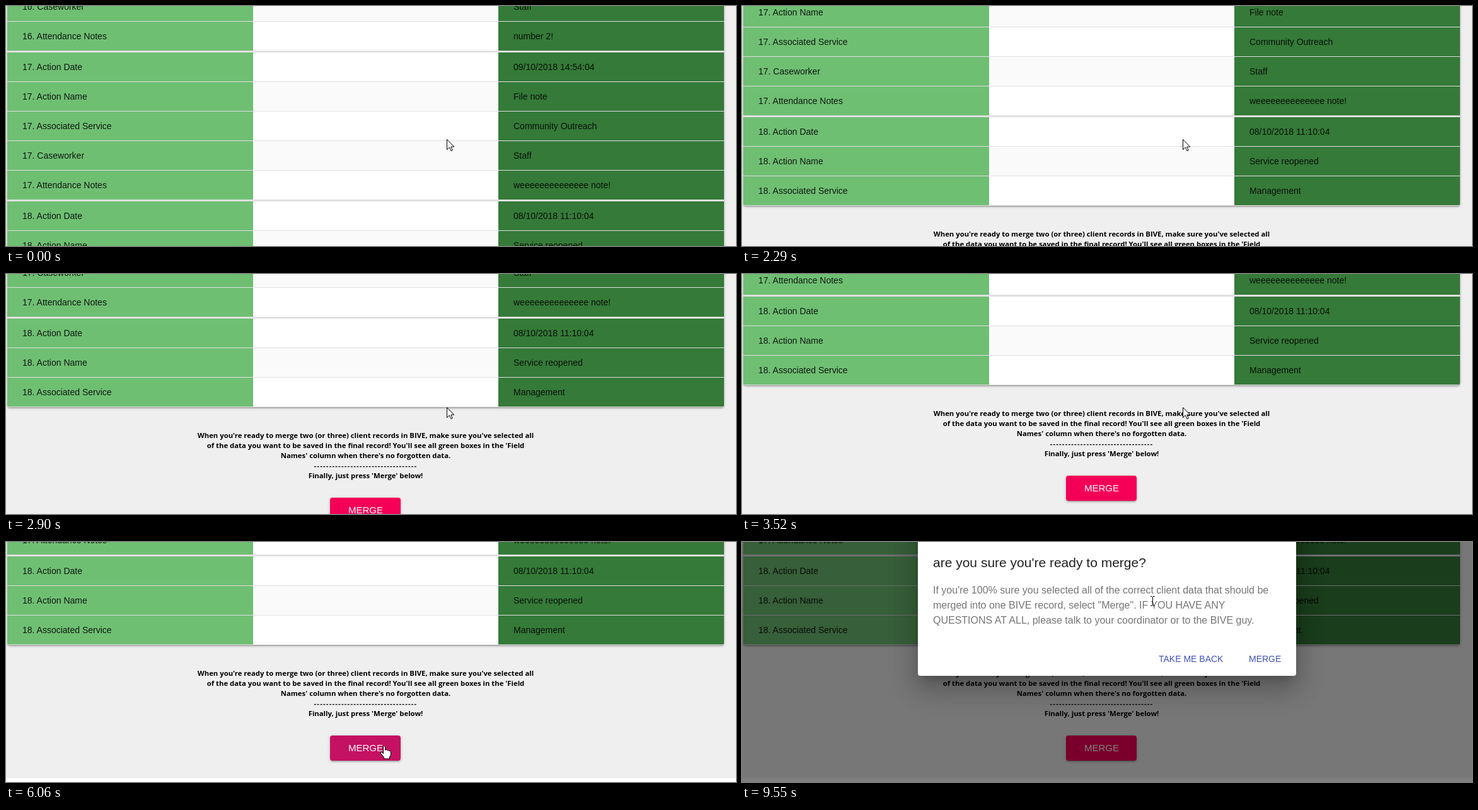
Write an HTML page that moves like this. It is 1158 px wide and 382 px high and loops after 9620 ms.

```html
<!DOCTYPE html>
<html lang="en">
<head>
<meta charset="utf-8">
<title>Merge records</title>
<style>
html, body { margin: 0; width: 100%; height: 100%; overflow: hidden; }
body { background: #fff; font-family: "Liberation Sans", Arial, sans-serif; }
#stage { position: relative; width: 1158px; height: 382px; overflow: hidden; }
#stage div, #stage p, #stage svg { position: absolute; margin: 0; white-space: nowrap; }
#page { left: 0; top: 0; width: 1158px; height: 664px; background: #efefef; }
#table {
  left: 2px; top: -40px; width: 1137px; height: 492px; overflow: hidden;
  background: #e0e0e0; border-radius: 0 0 4px 4px;
  box-shadow: 0 1px 5px rgba(0,0,0,.2), 0 2px 2px rgba(0,0,0,.14), 0 3px 1px -2px rgba(0,0,0,.12);
}
.cell { height: 46px; font-size: 14px; line-height: 46px; color: rgba(0,0,0,.87); text-indent: 24px; }
.label { left: 0; width: 390px; background: #6fbf73; }
.blank { left: 390px; width: 389px; background: #fff; }
.blank.alt { background: #fafafa; }
.value { left: 779px; width: 358px; background: #357a38; }
#note p {
  left: 270.5px; width: 600px; text-align: center; color: #000;
  font: bold 11.32px/16px "Open Sans", "Noto Sans", sans-serif;
}
#note .rule { letter-spacing: 1.18px; }
#button {
  --hover: 0; --press: 0; --lift: 0;
  left: 514px; top: 596px; width: 112px; height: 40px; border-radius: 4px; overflow: hidden;
  background: color-mix(in srgb, #c51162 calc(var(--hover) * 100%), #f50057);
  box-shadow:
    0 calc(1px + 2px * var(--lift)) 5px rgba(0,0,0,.2),
    0 calc(2px + 3px * var(--lift)) calc(2px + 3px * var(--lift)) rgba(0,0,0,.14),
    0 3px 1px -2px rgba(0,0,0,.12);
}
#button span { position: absolute; left: 29px; font-size: 15px; line-height: 40px; color: #fff; }
#ripple {
  width: 200px; height: 200px; left: -15px; top: -72px; border-radius: 50%; background: #fff;
  transform: scale(var(--press)); opacity: calc(.3 * min(1, 2 - 2 * var(--press)));
}
#modal { inset: 0; background: rgba(0,0,0,.5); }
#dialog {
  left: 279px; top: -60px; width: 600px; height: 273px; border-radius: 4px; background: #fff;
  box-shadow: 0 11px 15px -7px rgba(0,0,0,.2), 0 24px 38px 3px rgba(0,0,0,.14), 0 9px 46px 8px rgba(0,0,0,.12);
}
#dialog p { left: 24px; top: 125px; font-size: 16px; line-height: 24px; color: rgba(0,0,0,.54); }
#dialog .title { top: 81px; font-size: 21px; color: rgba(0,0,0,.87); }
#dialog .action { top: 234px; font-size: 14px; color: #3f51b5; }
#cursor { left: 0; top: 0; width: 1px; height: 1px; overflow: visible; }
</style>
</head>
<body>
<div id="stage">
  <div id="page">
    <div id="table"></div>
    <div id="note"></div>
    <div id="button"><div id="ripple"></div><span>MERGE</span></div>
  </div>
  <div id="modal">
    <div id="dialog">
      <p class="title">are you sure you're ready to merge?</p>
      <p>If you're 100% sure you selected all of the correct client data that should be<br>merged into one BIVE record, select "Merge". IF YOU HAVE ANY<br>QUESTIONS AT ALL, please talk to your coordinator or to the BIVE guy.</p>
      <p class="action" style="left:382px">TAKE ME BACK</p>
      <p class="action" style="left:525px">MERGE</p>
    </div>
  </div>
  <svg id="cursor">
    <path id="arrow" d="M.5 .5V16.6L4.4 12.9L7 18.6L9.3 17.6L6.8 12.1H11.8Z" fill="#fff" stroke="#000"/>
    <path id="beam" d="M-3 -7.5H-.5M1 -7.5H3.5M.5 -7V7M-3 7.5H-.5M1 7.5H3.5" fill="none" stroke="#000"/>
    <path id="hand" d="M-.5 13V1.5Q1 -.5 2.5 1.5V7Q4.5 5.5 5.5 7.5Q7.5 6.5 8.5 8.5Q11 7.5 11.5 10V15L9.5 18V21H.5V18.5L-5 12Q-5 9.5 -2.5 10.5Z" fill="#fff" stroke="#000"/>
  </svg>
</div>
<script>
const LOOP = 9620, STEP = 76, OPEN = 7140;
const $ = id => document.getElementById(id);

function add(parent, tag, cls, top, text = "") {
  const el = document.createElement(tag);
  el.className = cls;
  el.style.top = top + "px";
  el.textContent = text;
  parent.append(el);
}

// Table: five rows per action, sections divided by a thicker line
const fields = ["Action Date", "Action Name", "Associated Service", "Caseworker", "Attendance Notes"];
const actions = {
  16: [null, null, null, "Staff", "number 2!"],
  17: ["09/10/2018 14:54:04", "File note", "Community Outreach", "Staff", "weeeeeeeeeeeeee note!"],
  18: ["08/10/2018 11:10:04", "Service reopened", "Management"]
};
for (const n in actions) {
  actions[n].forEach((value, i) => {
    if (!value) return;
    const top = 114 + (n - 17) * 237 + i * 47;
    add($("table"), "div", "cell label", top, `${n}. ${fields[i]}`);
    add($("table"), "div", "cell blank" + (i % 2 ? " alt" : ""), top);
    add($("table"), "div", "cell value", top, value);
  });
}

[
  "When you're ready to merge two (or three) client records in BIVE, make sure you've selected all",
  "of the data you want to be saved in the final record! You'll see all green boxes in the 'Field",
  "Names' column when there's no forgotten data.",
  "-".repeat(34),
  "Finally, just press 'Merge' below!"
].forEach((line, i) => add($("note"), "p", i === 3 ? "rule" : "", 489 + i * 16, line));

// Each move: start time, number of steps, destination
const scrolls = [
  { start: 1210, steps: 8, y: 120 },
  { start: 2290, steps: 4, y: 167 },
  { start: 2590, steps: 8, y: 270 },
  { start: 3520, steps: 4, y: 288 }
];
const glides = [
  { start: 4600, steps: 13, x: 636, y: 308 },
  { start: 5600, steps: 7, x: 599, y: 324 },
  { start: 8080, steps: 9, x: 651, y: 123 },
  { start: 9390, steps: 3, x: 651, y: 94 }
];

const slowDown = p => 1 - (1 - p) ** 1.25;
const smooth = p => p * p * (3 - 2 * p);

function progress(t, start, steps) {
  if (t < start) return 0;
  return Math.min(steps, Math.floor((t - start) / STEP) + 1) / steps;
}

function follow(moves, from, axis, ease, t) {
  const end = moves.reduce(
    (pos, m) => pos + (m[axis] - pos) * ease(progress(t, m.start, m.steps)), from);
  return Math.round(end);
}

const inside = (x, y, left, top, right, bottom) => x >= left && x < right && y >= top && y < bottom;

function cursorKind(x, y, t) {
  if (t < glides[0].start) return "arrow";
  if (t >= OPEN) {
    const onLine = inside(x, y, 303, 67, 835, 136) && (y - 67) % 24 < 18;
    return onLine ? "beam" : "arrow";
  }
  if (inside(x, y, 514, 308, 626, 348)) return "hand";
  return inside(x, y, 303, 201, 838, 249) ? "beam" : "arrow";
}

function draw(t) {
  const scroll = follow(scrolls, 0, "y", slowDown, t);
  $("page").style.transform = `translateY(${-scroll}px)`;

  const press = progress(t, 6360, 8);
  const button = $("button").style;
  button.setProperty("--hover", t < OPEN ? progress(t, 5680, 4) : 0);
  button.setProperty("--press", press);
  button.setProperty("--lift", Math.sin(press * Math.PI).toFixed(3));
  $("modal").style.visibility = t >= OPEN ? "visible" : "hidden";

  const x = follow(glides, 699, "x", smooth, t);
  const y = follow(glides, 212, "y", smooth, t);
  const kind = cursorKind(x, y, t);
  $("cursor").style.transform = `translate(${x}px, ${y}px)`;
  for (const id of ["arrow", "beam", "hand"]) {
    $(id).style.display = id === kind ? "" : "none";
  }
}

const begin = performance.now();
function tick() {
  draw((performance.now() - begin) % LOOP);
  requestAnimationFrame(tick);
}
tick();
</script>
</body>
</html>
```
